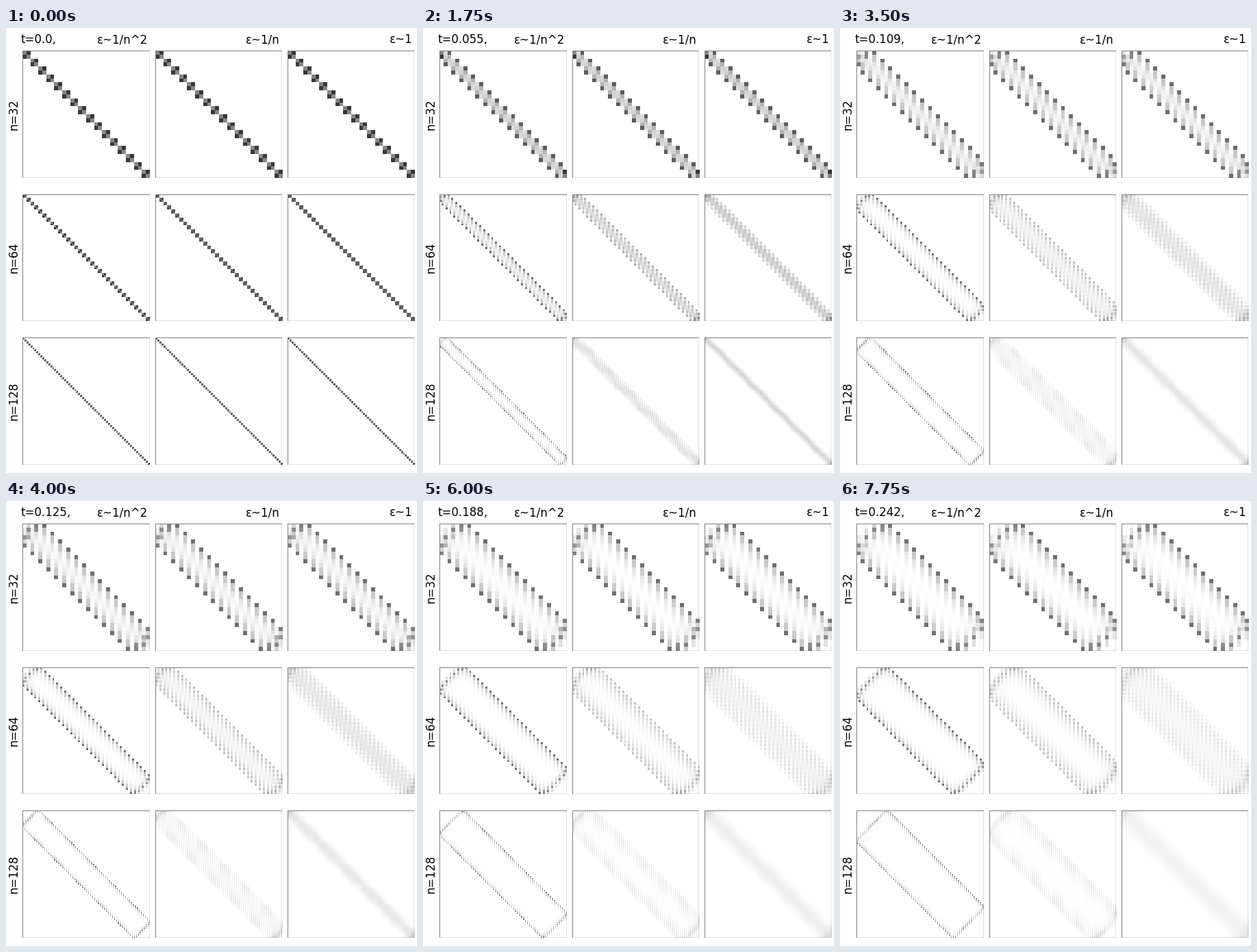
These frames come from a looping animation (600x650 px, 8 s). A matplotlib script:

```python
import numpy as np
import matplotlib.pyplot as plt
from matplotlib.animation import FuncAnimation

W, H, DPI = 600, 650, 100
FRAMES, INTERVAL = 32, 250
STEPS_PER_UNIT = 128
SIZES = (32, 64, 128)
LABELS = ("ε~1/n^2", "ε~1/n", "ε~1")
VMAX = 0.8
X0, DX, Y0, DY, SIDE = 24.4, 193.25, 33.4, 209.5, 185.25

plt.rcParams["font.family"] = "DejaVu Sans"


def couplings(n, beta, steps):
    """Entropic transport solved on alternating pairs of columns."""
    m = np.eye(n)
    rows = np.arange(n)[:, None]
    out = []
    for step in range(steps):
        i = np.arange(step % 2, n - 1, 2)
        mass = m[:, i] + m[:, i + 1]
        # bisect the offset that leaves unit mass in each column
        lo, hi = np.full(len(i), -float(n)), np.full(len(i), 2.0 * n)
        for _ in range(36):
            mid = (lo + hi) / 2
            part = mass / (1 + np.exp(beta * (rows - mid)))
            heavy = part.sum(axis=0) > 1
            hi = np.where(heavy, mid, hi)
            lo = np.where(heavy, lo, mid)
        m[:, i + 1], m[:, i] = part, mass - part
        out.append(m.copy())
    return out


fig = plt.figure(figsize=(W / DPI, H / DPI), dpi=DPI, facecolor="white")


def text(x, y, s, **kw):
    return fig.text(x / W, 1 - y / H, s, fontsize=12, color="black",
                    va="baseline", **kw)


def border(x, y, w, h, color, alpha=1):
    fig.add_artist(plt.Rectangle(
        (x / W, 1 - (y + h) / H), w / W, h / H, transform=fig.transFigure,
        facecolor=color, alpha=alpha, linewidth=0, antialiased=False))


panels = []
for r, n in enumerate(SIZES):
    top = Y0 + r * DY
    text(17, top + SIDE / 2, f"n={n}", rotation=90, ha="center",
         rotation_mode="anchor")
    for c in range(3):
        left = X0 + c * DX
        ax = fig.add_axes([left / W, 1 - (top + SIDE) / H, SIDE / W, SIDE / H])
        ax.axis("off")
        beta = (SIZES[0] / n) ** c
        mats = couplings(n, beta, FRAMES * n // STEPS_PER_UNIT)
        im = ax.imshow(mats[0], cmap="gray_r", vmin=0, vmax=VMAX,
                       aspect="auto", interpolation="nearest")
        panels.append((im, n, mats))
        x, y = round(left), round(top)
        x1, y1 = round(left + SIDE), round(top + SIDE)
        border(x1 - 1, y, 1, y1 - y, "black", 0.12)
        border(x, y1 - 1, x1 - x, 1, "black", 0.12)
        border(x, y, x1 - x, 1, "#808080")
        border(x, y, 1, y1 - y, "#808080")

for c, label in enumerate(LABELS):
    text(X0 + c * DX + SIDE - 3, 22, label, ha="right")
clock = text(21.7, 22, "", ha="left")


def update(k):
    clock.set_text(f"t={round(k / STEPS_PER_UNIT, 3)},")
    for im, n, mats in panels:
        im.set_data(mats[k * n // STEPS_PER_UNIT])
    return [clock] + [p[0] for p in panels]


anim = FuncAnimation(fig, update, frames=FRAMES, interval=INTERVAL,
                     repeat=True, repeat_delay=0)
plt.show()
```
